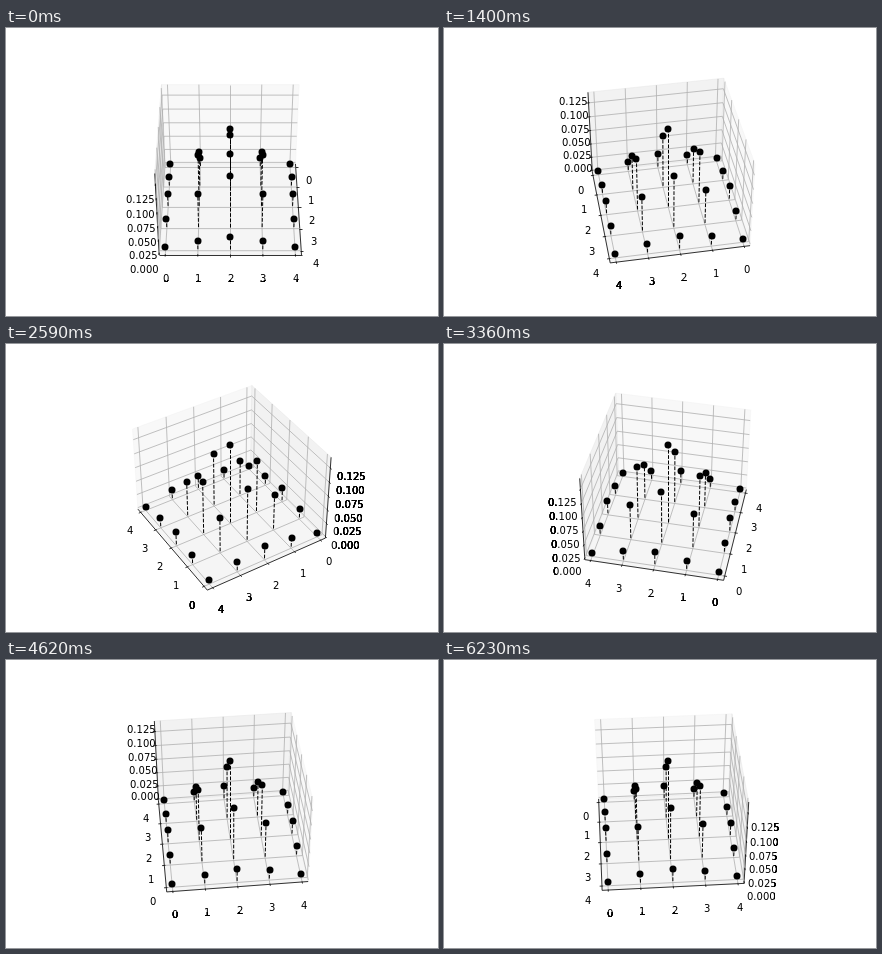
These frames come from a looping animation (432 px wide and 288 px high, 6300 ms). An HTML page:

```html
<!DOCTYPE html>
<html lang="en">
<head>
<meta charset="utf-8">
<title>Rotating 3D stem plot</title>
<style>
  html, body { margin: 0; width: 100%; height: 100%; overflow: hidden; background: #fff; }
  svg { display: block; }
  text { font: 10px "DejaVu Sans", Verdana, sans-serif; fill: #000; white-space: pre; }
  path { fill: none; }
  .axis { stroke: #000; stroke-width: .8; }
  .grid { stroke: #b0b0b0; stroke-width: .8; }
  .stem { stroke: #000; stroke-width: 1; stroke-dasharray: 3.7 1.6; }
  .pane { fill-opacity: .5; stroke-opacity: .5; stroke-width: 1; }
</style>
</head>
<body>
<svg width="432" height="288" viewBox="0 0 432 288">
  <g id="under"></g>
  <rect x="113" y="35" width="217" height="217" fill="#fff"/>
  <g id="plot"></g>
</svg>
<script>
const STEP = 70, COUNT = 90, DEG = 4;
const RAD = Math.PI / 180;
const ELEV = 40 * RAD, SE = Math.sin(ELEV), CE = Math.cos(ELEV);
const DIST = 10, SCALE = 1175.35, CX = 224.34, CY = 140.34;
const PEAK = 36 / 256;
const LIMITS = [[-0.1, 4.1], [-0.1, 4.1], [0, PEAK]];
const ASPECT = [4, 4, 3].map(v => v * 1.82946 / Math.sqrt(41));
const CELL = ASPECT.map(v => v / 12);
const EDGE = ASPECT.map(v => v * (0.5 + 1 / 48));
const LABEL_GAP = 11.5 * 48 / 434.88;
const COLORS = ['#f2f2f2', '#e6e6e6', '#ececec'];
const KERNEL = [1, 4, 6, 4, 1];
const WHOLE = [0, 1, 2, 3, 4];
const TICKS = [WHOLE, WHOLE, [0, 1, 2, 3, 4, 5].map(i => i * 0.025)];
const LABEL_LAYERS = 5;

const under = document.getElementById('under');
const plot = document.getElementById('plot');

// data value to centred box units
const toBox = (v, i) => ((v - LIMITS[i][0]) / (LIMITS[i][1] - LIMITS[i][0]) - 0.5) * ASPECT[i];

const put = (p, i, v) => { const q = p.slice(); q[i] = v; return q; };

function camera(azim) {
  const s = Math.sin(azim), c = Math.cos(azim);
  return ([x, y, z]) => {
    const near = x * c + y * s;
    const k = SCALE / (DIST - near * CE - z * SE);
    return [CX + (y * c - x * s) * k, CY - (z * CE - near * SE) * k];
  };
}

// lines that run straight along the pixel grid land on pixel centres
function snap(pts) {
  const straight = pts.every((p, i) => !i ||
    Math.abs(p[0] - pts[i - 1][0]) < 1e-4 || Math.abs(p[1] - pts[i - 1][1]) < 1e-4);
  return straight ? pts.map(p => p.map(v => Math.floor(v + 0.5) + 0.5)) : pts;
}

const coords = pts => pts.map(p => p.map(v => v.toFixed(2)).join(' ')).join('L');
const line = (cls, pts) => `<path class="${cls}" d="M${coords(snap(pts))}"/>`;

function label(str, [x, y]) {
  const width = str.length > 1 ? 27.4 : 5;
  return `<text x="${Math.round(x - width / 2)}" y="${Math.round(y) + 9}">${str}</text>`;
}

function draw(frame) {
  const azim = frame * DEG * RAD;
  const proj = camera(azim);
  const sign = [Math.cos(azim) < -1e-9 ? 1 : -1, Math.sin(azim) < -1e-9 ? 1 : -1, -1];
  const far = EDGE.map((e, i) => e * sign[i]);
  const near = far.map(v => -v);
  let out = '', labels = '';

  for (let i = 0; i < 3; i++) {
    const a = (i + 1) % 3, b = (i + 2) % 3;
    const p = put(far, a, near[a]);
    const quad = [far, p, put(p, b, near[b]), put(far, b, near[b])].map(proj);
    out += `<path class="pane" d="M${coords(quad)}Z" style="fill:${COLORS[i]};stroke:${COLORS[i]}"/>`;
  }

  for (let i = 0; i < 3; i++) {
    const side = i === 0 ? 1 : 0;
    const start = put(far, side, near[side]);
    out += line('axis', [start, put(start, i, near[i])].map(proj));
    const a = (i + 1) % 3, b = (i + 2) % 3;
    const locs = TICKS[i].map(v => toBox(v, i));

    for (const v of locs) {
      const root = put(far, i, v);
      out += line('grid', [put(root, a, near[a]), root, put(root, b, near[b])].map(proj));
    }
    locs.forEach((v, n) => {
      const at = put(start, i, v);
      const dir = Math.sign(at[side]) * CELL[side];
      out += line('axis', [0.2, -0.1].map(f => proj(put(at, side, at[side] + f * dir))));
      const pos = at.map((q, j) => j === i ? q : q + Math.sign(q) * LABEL_GAP * CELL[j]);
      labels += label(i === 2 ? TICKS[i][n].toFixed(3) : String(TICKS[i][n]), proj(pos));
    });
  }

  let dots = '';
  for (const x of WHOLE) for (const y of WHOLE) {
    const z = KERNEL[x] * KERNEL[y] / 256;
    const base = [toBox(x, 0), toBox(y, 1), toBox(0, 2)];
    const top = proj(put(base, 2, toBox(z, 2)));
    out += line('stem', [proj(base), top]);
    dots += `<circle cx="${Math.round(top[0])}" cy="${Math.round(top[1])}" r="3.5"/>`;
  }

  plot.innerHTML = out + labels + dots;
  // stacked labels look heavier wherever they leave the white axes square
  under.innerHTML = labels.repeat(LABEL_LAYERS);
}

let shown = -1;
function tick() {
  const frame = Math.floor(performance.now() / STEP) % COUNT;
  if (frame !== shown) draw(shown = frame);
  requestAnimationFrame(tick);
}
tick();
</script>
</body>
</html>
```
